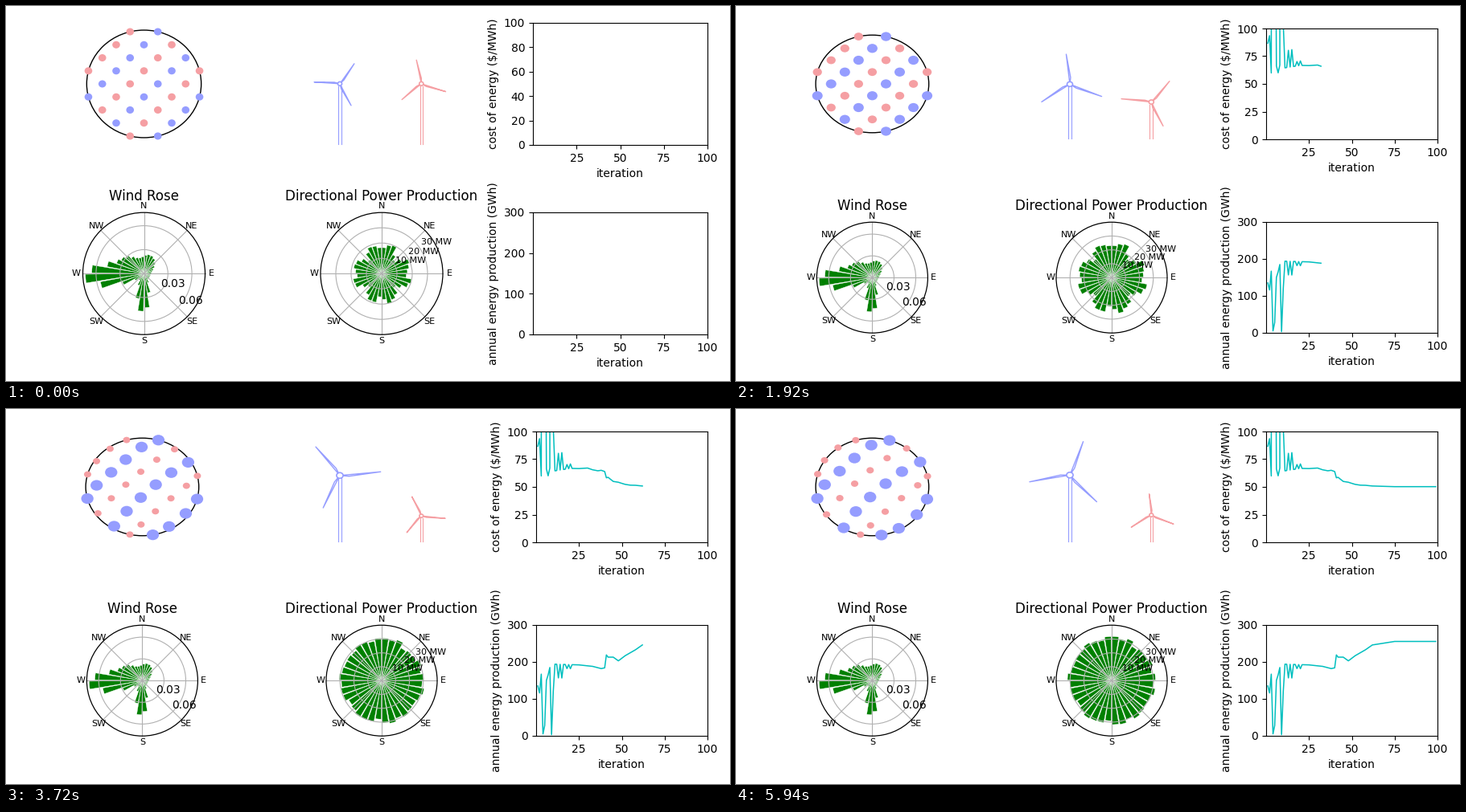
A matplotlib script for the animation above (6000 ms loop, 900x467 px).

```python
import numpy as np
import matplotlib.pyplot as plt
from matplotlib.animation import FuncAnimation
from matplotlib.collections import PolyCollection
from matplotlib.patches import Ellipse, Polygon

W, H, DPI = 900, 467, 100
FRAMES, INTERVAL = 100, 60
BLUE, RED, GRID, CYAN = "#959dff", "#f59fa3", "#b0b0b0", (0, 0.75, 0.75)

plt.rcParams.update({"font.family": "DejaVu Sans", "font.size": 10})
fig = plt.figure(figsize=(W / DPI, H / DPI), dpi=DPI, facecolor="white")
stage = fig.add_axes([0, 0, 1, 1])

# Chart left edge, farm centre x, cost chart span, energy chart span, cost tick step
FIRST = 655, 171.5, (21, 173), (257, 409), 20
FITTED = 659, 169.4, (27, 166), (269, 408), 20
SETTLED = 659, 169.4, (28, 166), (269, 407), 25
RIGHT, POWER_X, TOWERS_X = 872, 467, (415, 516.3)

its = np.arange(FRAMES)


def ramp(k, *keys):
    """Piecewise linear value at k through (position, value) keys."""
    return np.interp(k, *zip(*keys))


# Annual energy: a wild search first, then slow gains; cost is spending over energy
aep = ramp(its, (11, 194), (25, 192), (33, 188), (38, 182), (40, 184), (41, 219),
           (42, 213), (45, 213), (48, 203), (52, 217), (58, 233), (62, 246), (75, 255.5))
aep[:11] = 140, 135, 116, 167, 5, 28, 150, 165, 185, 3, 120
aep[[13, 15]] -= 37
aep[[18, 20]] -= 11
spend = ramp(its, (1, 11700), (3, 10000), (7, 9900), (8, 12400), (20, 12850), (30, 12700),
             (36, 11900), (40, 11750), (41, 12750), (45, 11700), (48, 11000),
             (55, 11600), (62, 12500), (75, 12830))
cost = spend / aep

bearing = np.arange(5, 360, 10)


def bump(offset, width):
    return np.exp(-(offset / width) ** 2)


def lobe(center, height, width):
    return height * bump((bearing - center + 180) % 360 - 180, width)


wind = (8 + lobe(20, 16, 40) + lobe(182, 40, 18) + lobe(265, 56, 19) + lobe(300, 24, 35)) / 76

# A regular grid loses power along its diagonals and, less so, along its rows
wake = bump(bearing % 90 - 45, 12) + 0.6 * bump((bearing + 45) % 90 - 45, 8)
jitter = np.random.default_rng(4).uniform(-0.06, 0.06, bearing.size)


def power_bars(k):
    depth = ramp(k, (20, 0.4), (45, 0.22), (62, 0.06), (76, 0.02))
    shape = 1 - depth * wake + jitter
    return aep[k] * 0.003 * shape / shape.mean()


# Farm sites on a diagonal grid in a unit circle; colours alternate along each row
sites, colors = [], []
for row, n, first in zip(range(-4, 5), (2, 3, 4, 5, 4, 5, 4, 3, 2), "RRRRBBRBR"):
    for i in range(n):
        sites.append(((2 * i - n + 1) / 17 ** 0.5, row / 17 ** 0.5))
        colors.append(RED if (first == "R") == (i % 2 == 0) else BLUE)
sites = np.array(sites)


def spread(points):
    """Push the sites out to the rim, twist them and let the middle drift up left."""
    x, y = points.T
    r, a = np.hypot(x, y), np.arctan2(x, -y)
    twist = 0.015 + 0.053 * np.sin(a) + 0.068 * np.cos(3 * a - np.radians(100))
    a = a + twist * r ** 2
    reach, calm = np.minimum(1, 1.13 * r), np.maximum(0, 1 - r ** 2)
    return np.c_[reach * np.sin(a) - 0.04 * calm, -reach * np.cos(a) - 0.07 * calm]


shift = spread(sites) - sites

# Turbine blade length and hub height by frame
SIZE_AT = [0, 6, 18, 45, 62, 99]
BLADE = {BLUE: [32, 34.5, 43, 43.7, 51, 51], RED: [32, 35, 43.5, 32, 30, 30.5]}
HEIGHT = {BLUE: [68.5, 54, 57.5, 77.5, 82.5, 83], RED: [68.5, 54, 57.5, 34.5, 32, 33]}
SPIN = {BLUE: (34, -5), RED: (109, -6)}


def add_chart(ylabel, top):
    ax = fig.add_axes([0.73, 0.1, 0.2, 0.3])
    ax.set(xlim=(0, 100), ylim=(0, top), xticks=[25, 50, 75, 100],
           xlabel="iteration", ylabel=ylabel)
    return ax, ax.plot([], [], color=CYAN, lw=1.1)[0]


cost_ax, cost_line = add_chart("cost of energy (\\$/MWh)", 100)
aep_ax, aep_line = add_chart("annual energy production (GWh)", 300)
aep_ax.set_yticks([0, 100, 200, 300])


def place(ax, left, span):
    top, bottom = span
    ax.set_position([left / W, 1 - bottom / H, (RIGHT - left) / W, (bottom - top) / H])


def label(x, y, text, size):
    # y is the middle of the capitals
    stage.text(x, y + size * 0.506 - 0.8, text, size=size, ha="center", va="baseline", zorder=5)


def ellipse(x, y, rx, ry, **style):
    stage.add_patch(Ellipse((x, y), 2 * rx, 2 * ry, **style))


def draw_farm(k, cx, cy, rx, ry, size):
    ellipse(cx, cy, rx, ry, fc="none", ec="black", lw=1)
    moved = sites + shift * ramp(k, (45, 0), (62, 0.7), (76, 1))
    for (x, y), color in zip(moved, colors):
        r = 0.15 * size[color]
        ellipse(cx + x * rx, cy + y * ry, r, r * ry / rx, fc=color, ec="none", zorder=2)


def draw_turbine(k, x, ground, rx, ry, color, length):
    asp = ry / rx
    hub = np.array([x, ground - np.interp(k, SIZE_AT, HEIGHT[color]) * ry / 61])
    half = 0.6 + 0.033 * length
    for side in (-half, half):
        stage.plot([x + side] * 2, [hub[1] + 3, ground], color=color, lw=0.8)
    phase, rate = SPIN[color]
    for turn in (0, 120, 240):
        a = np.radians(phase + rate * k + turn)
        along = length * np.array([np.sin(a), -np.cos(a) * asp])
        across = length * np.array([np.cos(a), np.sin(a) * asp])
        stage.add_patch(Polygon([hub, hub + 0.22 * along + 0.045 * across, hub + along],
                                fc="none", ec=color, lw=1, joinstyle="round", zorder=3))
    r = 0.08 * length
    ellipse(*hub, r, r * asp, fc="white", ec=color, lw=1.2, zorder=4)


def draw_rose(cx, cy, R, title, bars, rings, marks, mark_size):
    verts = []
    for mid, r in zip(bearing, bars * R):
        a = np.radians(mid + np.linspace(-4.3, 4.3, 5))
        verts.append(np.vstack([[cx, cy], np.c_[cx + r * np.sin(a), cy - r * np.cos(a)]]))
    stage.add_collection(PolyCollection(verts, fc="green", ec="white", lw=0.3, zorder=1),
                         autolim=False)
    for i, name in enumerate("N NE E SE S SW W NW".split()):
        dx, dy = R * np.sin(i * np.pi / 4), -R * np.cos(i * np.pi / 4)
        stage.plot([cx, cx + dx], [cy, cy + dy], color=GRID, lw=0.8, zorder=1.5)
        label(cx + 1.105 * dx, cy + 1.105 * dy, name, 8)
    for r in rings:
        ellipse(cx, cy, r * R, r * R, fc="none", ec=GRID, lw=0.8, zorder=1.5)
    ellipse(cx, cy, R, R, fc="none", ec="black", lw=0.9, zorder=2)
    for dx, dy, text in marks:
        label(cx + dx * R, cy + dy * R, text, mark_size)
    label(cx, cy - R - 20.4, title, 12)


def update(k):
    left, cx, cost_span, aep_span, step = FIRST if k == 0 else FITTED if k < 9 else SETTLED
    place(cost_ax, left, cost_span)
    place(aep_ax, left, aep_span)
    cost_ax.set_yticks(range(0, 101, step))
    cost_line.set_data(its[1:k + 1], cost[1:k + 1])
    aep_line.set_data(its[1:k + 1], aep[1:k + 1])

    stage.clear()
    stage.set(xlim=(0, W), ylim=(H, 0), autoscale_on=False)
    stage.axis("off")

    # The other panels follow the height of the charts
    top, bottom = cost_span
    rx, ry = 0.415 * cx, 0.4405 * (bottom - top)
    size = {c: np.interp(k, SIZE_AT, BLADE[c]) for c in BLADE}
    draw_farm(k, cx, (top + bottom) / 2, rx, ry, size)
    for x, color in zip(TOWERS_X, (BLUE, RED)):
        draw_turbine(k, x, bottom - 1, rx, ry, color, size[color])

    top, bottom = aep_span
    cy, R = (top + bottom) / 2 + 0.2, (bottom - top) / 2
    draw_rose(cx, cy, R, "Wind Rose", wind, (0.392, 0.784),
              [(0.47, 0.165, "0.03"), (0.76, 0.446, "0.06")], 10)
    draw_rose(POWER_X, cy, R, "Directional Power Production", power_bars(k), (0.25, 0.5, 0.75),
              [(0.47, -0.217, "10 MW"), (0.688, -0.362, "20 MW"), (0.891, -0.513, "30 MW")], 8)
    return []


anim = FuncAnimation(fig, update, frames=FRAMES, init_func=lambda: [],
                     interval=INTERVAL, repeat=True, repeat_delay=0, blit=False)
plt.show()
```
